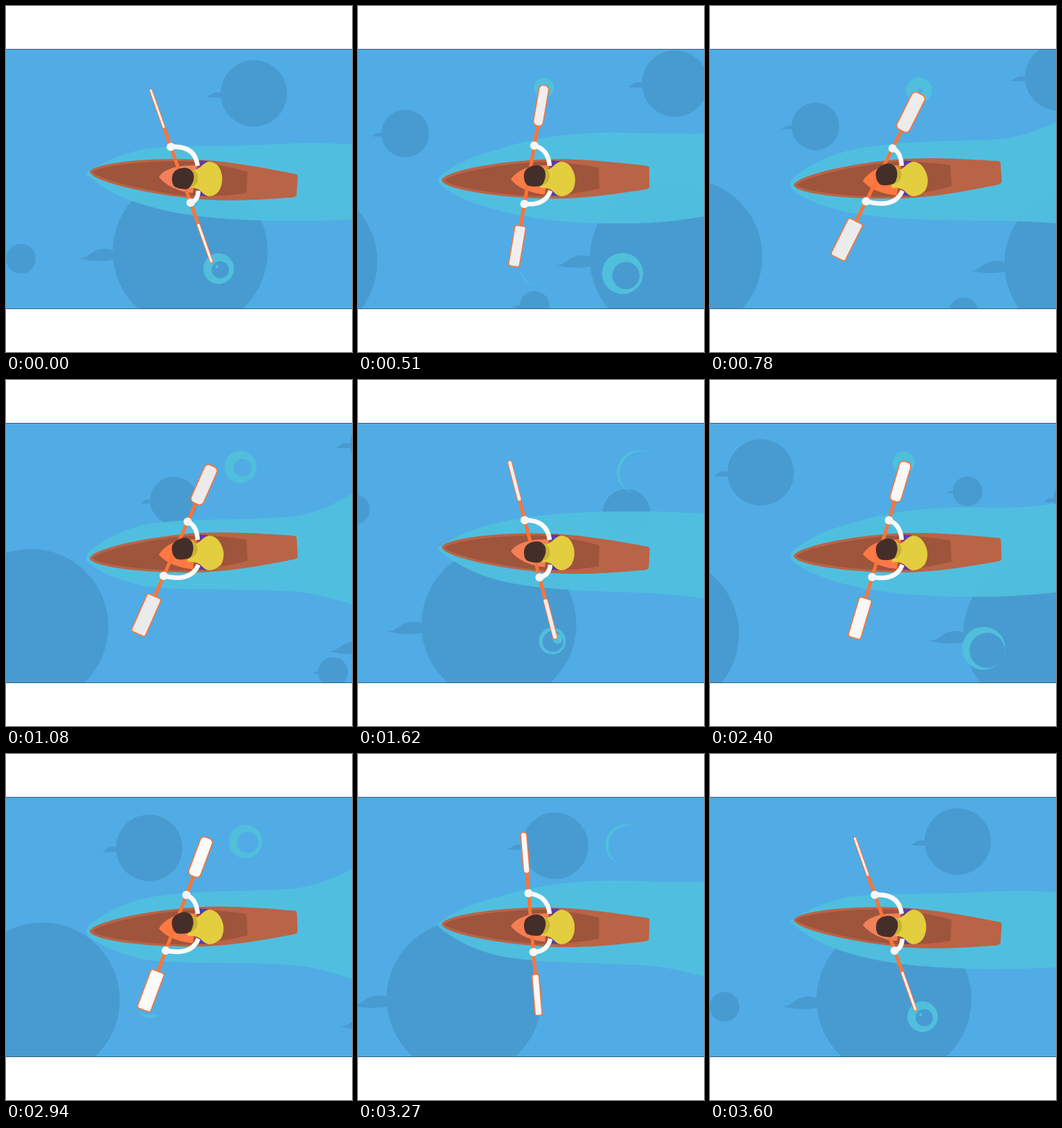
Recreate the animation shown at these times as an HTML page with a canvas. Size 500 by 500 pixels, loop 3630 ms.

```html
<!DOCTYPE html>
<html lang="en">
<head>
<meta charset="utf-8">
<title>Kayak</title>
<style>
html, body { margin: 0; width: 100%; height: 100%; overflow: hidden; background: #fff; }
canvas { display: block; width: 500px; height: 500px; }
</style>
</head>
<body>
<canvas id="stage" width="500" height="500"></canvas>
<script>
const ctx = document.getElementById('stage').getContext('2d');
const LOOP = 3630, LAP = 3600, STROKE = 1800;
const FOAM = '#50bfdc', SHADE = '#489bd1', ORANGE = '#fb7438';
const TAU = Math.PI * 2, DEG = Math.PI / 180;

const mix = (a, b, p) => a + (b - a) * p;
const clamp = v => Math.max(0, Math.min(1, v));
const wave = (t, period) => Math.cos(TAU * t / period);

// Eased swing from 0 to 1 and back, once per stroke
function swing(ph) {
  const p = 1 - Math.abs(ph / (STROKE / 2) - 1);
  return p * p * (3 - 2 * p);
}

// Shadows ease across: x is the place at time mid, reach and pace set the
// sine, and y sways by bob around its peak time
const shadows = [
  { r: 112, lap: STROKE, mid: 2000, x: 337, reach: 460, pace: 1288, y: 383, bob: -30, peak: 1500, sway: 900 },
  { r: 48, lap: LAP, mid: 2400, x: 73, reach: 547, pace: 2190, y: 98, bob: 38, peak: 2800, sway: 1100 },
  { r: 34.5, lap: LAP, mid: 510, x: 68, reach: 500, pace: 1600, y: 182, bob: 10, peak: 1650, sway: 230 },
  { r: 21.5, lap: LAP, mid: 0, x: 21, reach: 611, pace: 1300, y: 382, bob: 61, peak: 740, sway: 400 },
  { r: 21.5, lap: LAP, mid: 1620, x: -5, reach: 667, pace: 1300, y: 174, bob: 13, peak: 1620, sway: 250 }
];
const tail = new Path2D('M-1.47,.08C-1.36,.12 -1.28,0 -1.2,-.02Q-1.08,-.06 -.95,0L-.95,.1Q-1.22,.16 -1.47,.08Z');

// Splashes drift right and open up into a ring, then a crescent
const splashes = [
  { start: 1530, life: 940, x: 267.5, y: 376, vx: .147, r: 18, dx: 5, dy: 3,
    hole: p => .53 + .47 * Math.abs(2 * p - 1) ** 3 },
  { start: 440, life: 1240, x: 260, y: 117, vx: .123, r: 13.5, dx: 4, dy: 1.5,
    hole: p => clamp((p - .15) * 1.55) }
];
const trickle = new Path2D('M235,383Q240,400 254,403');
const dip = new Path2D('M191,373Q207,389 221,376Q207,379 191,373Z');

const hull = new Path2D('M121,250C122,238 200,222 285,221.5C340,222 400,231 416,232.5Q421,233 421,236L421,263Q421,266 414,267C390,270 340,278.5 285,278.5C200,277 122,262 121,250Z');
const well = new Path2D('M125,250C130,242 190,229 260,225Q310,226 348,234.5L348.5,265Q310,274 260,275C190,271 130,258 125,250Z');
const straps = new Path2D('M274,223L292,224L279,233ZM280,264L293,275L278,274Z');
const head = new Path2D('M-12,-10Q-6,-15 2,-15.5Q10,-15.5 14,-8.5Q17,0 13,8Q11,14 6,15Q-4,16.5 -11,13.5Q-16,9 -16,0Q-16,-6 -12,-10Z');

function disc(x, y, r, color) {
  ctx.fillStyle = color;
  ctx.beginPath();
  ctx.arc(x, y, Math.max(0, r), 0, TAU);
  ctx.fill();
}

function fill(path, color) {
  ctx.fillStyle = color;
  ctx.fill(path);
}

function line(path, color, width) {
  ctx.strokeStyle = color;
  ctx.lineWidth = width;
  ctx.stroke(path);
}

function scoped(draw) {
  ctx.save();
  draw();
  ctx.restore();
}

function drawShadow(o, t) {
  for (let n = -2; n <= 2; n++) {
    const u = t % o.lap + n * o.lap, a = (u - o.mid) / o.pace;
    if (Math.abs(a) > Math.PI / 2) continue;
    scoped(() => {
      ctx.translate(o.x + o.reach * Math.sin(a), o.y + o.bob * Math.cos((u - o.peak) / o.sway));
      ctx.scale(o.r, o.r);
      disc(0, 0, 1, SHADE);
      fill(tail, SHADE);
    });
  }
}

function drawWake(ph, s) {
  const flare = x => clamp((x - 400) / 100) ** 2;
  const belly = x => Math.sin(Math.PI * clamp((x - 200) / 300));
  const spread = x => 57 * (1 - Math.exp((115 - x) / 70));
  const nose = (x, reach) => (s - .5) * Math.exp((120 - x) / reach);
  const top = x => 248 - spread(x) + 10 * nose(x, 60)
    + flare(x) * (19 * wave(ph - 90, STROKE) - 9)
    + 10 * belly(x) * wave(ph - 80, STROKE / 2);
  const low = x => 253 + spread(x) + 22 * nose(x, 120) + 4 * flare(x)
    + (7 * belly(x) - 12 * flare(x)) * wave(ph - 330, STROKE);
  ctx.beginPath();
  for (let x = 120; x <= 500; x += 5) ctx.lineTo(x, top(x));
  for (let x = 500; x >= 120; x -= 5) ctx.lineTo(x, low(x));
  ctx.quadraticCurveTo(112, (top(120) + low(120)) / 2, 120, top(120));
  ctx.fillStyle = 'rgba(80,194,223,.89)';
  ctx.fill();
}

function drawSplash(o, ph) {
  const age = (ph - o.start + STROKE) % STROKE, p = age / o.life;
  if (p > 1) return;
  const x = o.x + o.vx * age, y = o.y + .0135 * age;
  const r = (o.r + .015 * age) * clamp(age / 60), shift = p * (2 - p);
  scoped(() => {
    ctx.beginPath();
    ctx.rect(0, 0, 500, 500);
    ctx.arc(x + o.dx * shift, y + o.dy * shift, r * o.hole(p), 0, TAU);
    ctx.clip('evenodd');
    disc(x, y, r, FOAM);
  });
}

function drawDrops(ph) {
  const age = (ph - 1560 + STROKE) % STROKE;
  if (age < 330) disc(283 + .09 * age, 373 + .015 * age, 9 - age / 36, FOAM);
  if (ph > 420 && ph < 560) line(trickle, FOAM, 1.6);
  if (ph > 1100 && ph < 1260) fill(dip, FOAM);
}

function drawBoat(s) {
  scoped(() => {
    ctx.translate(271, 250);
    ctx.rotate((3.9 - 7.7 * s) * DEG);
    ctx.translate(-271, -250);
    fill(hull, '#b96446');
    fill(well, '#9f543c');
  });
}

function drawBody(s) {
  const y = 247 + 6 * s, r = 313 + 3 * s;
  const skin = `rgb(${mix(242, 255, s)},${mix(128, 120, s)},${mix(90, 64, s)})`;
  fill(new Path2D(`M221,${y}C226,${y - 9} 240,233 256,231L276,230L270,${270 + 4 * s}C250,${269 + 3 * s} 230,${y + 12} 221,${y}Z`), skin);
  fill(straps, '#5a3ca8');
  fill(new Path2D(`M264,239Q277,238 285,229Q290,225 295,225Q303,226 308,233Q${r + 4},250 ${r - 5},267Q302,275 293,275Q287,274 281,267Q274,262 ${266 - 4 * s},263Z`), '#e3ce3f');
  disc(264 - s, 249 - 5.5 * s, 13.5, '#c9b331');
}

function drawBlade(y, w, radius, color) {
  const edge = w < 9 ? 1 : 1.6;
  const layer = (inset, paint) => {
    const width = w - 2 * inset;
    ctx.beginPath();
    ctx.roundRect(-width / 2, y + inset, width, 61 - 2 * inset, Math.min(radius - inset, width / 2));
    ctx.fillStyle = paint;
    ctx.fill();
  };
  layer(0, ORANGE);
  layer(edge, color);
}

function drawPaddle(s, t) {
  const x = 253.2 - 10 * s, a = (-19.5 + 48.5 * s) * DEG;
  const grey = Math.round(243 + 8 * wave(t + 700, LAP));
  const white = `rgb(${grey},${grey},${grey})`;
  scoped(() => {
    ctx.translate(x, 246);
    ctx.rotate(a);
    ctx.fillStyle = ORANGE;
    ctx.fillRect(-2.5, -75, 5, 150);
    drawBlade(-134, 5 + 18 * s, 7, white);
    drawBlade(72, 5.5 + 20 * s, 4, white);
  });
  const hand = r => [x - r * Math.sin(a), 246 + r * Math.cos(a)];
  const far = hand(-45), near = hand(40.5);
  line(new Path2D(`M${far}Q${273 + 3 * s},${201 + 10 * s} 277,231`), '#fbfbfb', 6.5);
  line(new Path2D(`M${near}Q${277 - 11 * s},${282 + 12 * s} 278,267`), '#fbfbfb', 6.5);
  for (const spot of [far, near]) disc(...spot, 6, '#f6f6f6');
}

function drawHead(s) {
  scoped(() => {
    ctx.translate(256 - .5 * s, 249 - 5.8 * s);
    ctx.rotate((8 - 16 * s) * DEG);
    fill(head, '#442e29');
  });
}

function render(t) {
  const ph = t % STROKE, s = swing(ph);
  ctx.fillStyle = '#fff';
  ctx.fillRect(0, 0, 500, 500);
  scoped(() => {
    ctx.beginPath();
    ctx.rect(0, 62, 500, 376);
    ctx.clip();
    ctx.fillStyle = '#51ace5';
    ctx.fillRect(0, 62, 500, 376);
    for (const o of shadows) drawShadow(o, t);
    drawWake(ph, s);
    for (const o of splashes) drawSplash(o, ph);
    drawDrops(ph);
    drawBoat(s);
    drawBody(s);
    drawPaddle(s, t);
    drawHead(s);
    ctx.fillStyle = '#2c607f';
    ctx.fillRect(0, 62, 500, 1);
    ctx.fillRect(0, 437, 500, 1);
  });
}

const start = performance.now();
function tick() {
  render(Math.min((performance.now() - start) % LOOP, LAP));
  requestAnimationFrame(tick);
}
tick();
</script>
</body>
</html>
```
